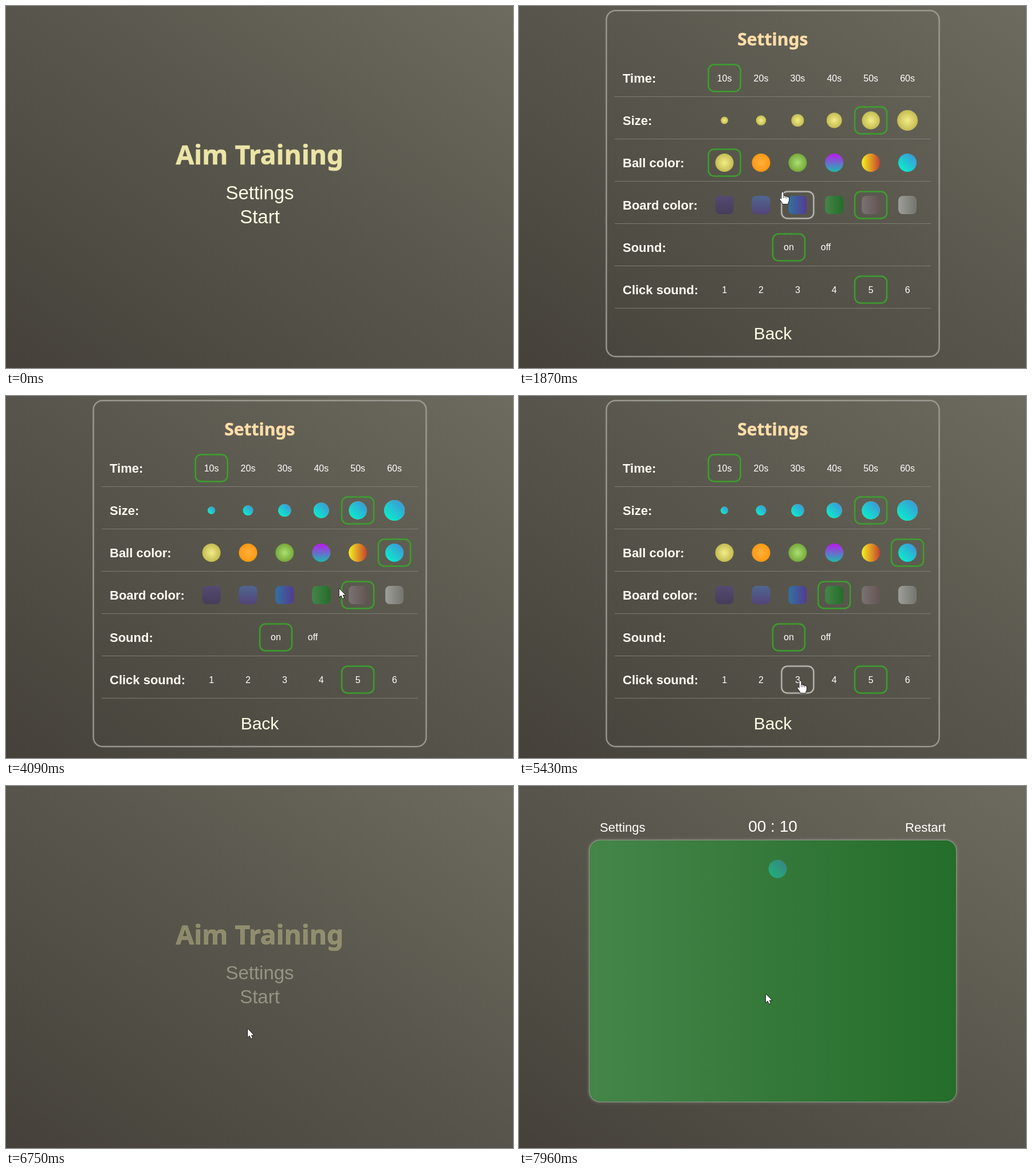
Recreate the animation shown at these times as an HTML page with a canvas. Size 885x633 px, loop 8000 ms.

```html
<!DOCTYPE html>
<html lang="en">
<head>
<meta charset="utf-8">
<title>Aim Training</title>
<style>
html, body { margin: 0; width: 100%; height: 100%; overflow: hidden; }
body { background: linear-gradient(to top right, #45413a, #58564c 52%, #6d6b5f); }
canvas { display: block; }
</style>
</head>
<body>
<canvas id="stage" width="885" height="633"></canvas>
<script>
const LOOP = 8000, FADE = 400, HOVER_FADE = 200;
const ctx = document.getElementById('stage').getContext('2d');
const SANS = '"Liberation Sans", Arial, sans-serif';
const HEADING = '"Noto Sans", Tahoma, sans-serif';
const GREEN = '#39aa2a', SILVER = '#c4c3bd';

// Moments of the clicks
const CLICK = { settings: 1040, ball: 3340, board: 4480, sound: 5640, back: 6200, start: 7110 };
const MENU_LOAD = 280, GAME_LOAD = 7740;

// Pointer moves: start, end, target x, target y
const MOVES = [
  [780, 781, 520, 345], [781, 1030, 460, 325], [1960, 2100, 392, 340],
  [2100, 2480, 590, 318], [2540, 2640, 596, 286], [2820, 3230, 672, 288],
  [3380, 3770, 582, 337], [4090, 4260, 562, 355], [4520, 4840, 477, 421],
  [5050, 5300, 491, 498], [5990, 6150, 443, 570], [6300, 6750, 422, 425],
  [6750, 7060, 431, 364]
];

const DIRECTION = { radial: [0, 0], down: [0, 1], right: [1, 0], rise: [1, -1] };
const BALLS = [
  'radial #f3ed88 #c3bb52', 'radial #ffb13c #ff9813', 'radial #abdf70 #76a93b',
  'down #bd18ec #1cbbae', 'right #f6f01f #c5412d', 'rise #00fbca #468adb'
];
const BOARDS = [
  'down #534b72 #453d59', 'down #50668f #534479', 'right #32729f #533b92',
  'right #458549 #246d2a', 'right #7a7272 #645553', 'right #9e9e9a #74746e'
];
const LABELS = ['Time:', 'Size:', 'Ball color:', 'Board color:', 'Sound:', 'Click sound:'];

const HAND = new Path2D('M-1.5 1.5Q0-.8 1.5 1.5V7.5Q3.3 6.2 4.5 8Q6.3 7 7.5 9Q10 8 11 11V15Q11 17 9.5 18.5V21H0V19.5Q-1.5 17.5-3.5 15L-5 12.5Q-4.5 10.5-1.5 12.8Z');
const FINGERS = new Path2D('M1.6 7.5V11M4.6 8.2V11M7.6 9.2V11.5');
const ARROW = new Path2D('M0 0V14.5L3.3 11.5L5.6 16.8L8 15.8L5.7 10.6H10.3Z');

const ramp = (t, from, to) => Math.min(1, Math.max(0, (t - from) / (to - from)));
const fadeAt = (t, from) => ramp(t, from, from + FADE);
const column = i => 358.6 + i * 63.9;
const rowY = i => 126 + i * 74;
const ballSize = i => 6.5 + i * 2.3;

let time = 0, overLink = false;

function pointerAt(t) {
  let x = -99, y = -99;
  for (const [from, to, toX, toY] of MOVES) {
    const k = ramp(t, from, to);
    x += (toX - x) * k;
    y += (toY - y) * k;
  }
  return [x, y];
}

// Share of the last moments the pointer spent inside a box, which fades hovers in and out
function hover(cx, cy, halfW, halfH) {
  const samples = 10;
  let hits = 0;
  for (let i = 0; i < samples; i++) {
    const [x, y] = pointerAt(time - i * HOVER_FADE / samples);
    if (Math.abs(x - cx) > halfW || Math.abs(y - cy) > halfH) continue;
    hits++;
    if (i === 0) overLink = true;
  }
  return hits / samples;
}

function faded(alpha, draw) {
  if (alpha <= 0) return;
  ctx.save();
  ctx.globalAlpha *= alpha;
  draw();
  ctx.restore();
}

function text(str, x, y, size, color, align = 'center', weight = 400, font = SANS) {
  ctx.font = `${weight} ${size}px ${font}`;
  ctx.textAlign = align;
  ctx.fillStyle = color;
  ctx.fillText(str, x, y);
}

function heading(str, y, size, color) {
  text(str, 442.8, y, size, color, 'center', 700, HEADING);
  ctx.strokeStyle = color;
  ctx.lineWidth = size * .015;
  ctx.strokeText(str, 442.8, y);
}

function link(str, y, size) {
  const over = hover(443, y - size / 3, size * 1.8, size * .6);
  ctx.save();
  ctx.translate(443, y);
  ctx.scale(1 + .05 * over, 1 + .05 * over);
  text(str, 0, 0, size, '#fffde3');
  faded(over, () => text(str, 0, 0, size, '#ffb046'));
  ctx.restore();
}

function box(x, y, w, h, r) {
  ctx.beginPath();
  ctx.roundRect(x, y, w, h, r);
}

function outline(color, blur) {
  ctx.save();
  ctx.strokeStyle = ctx.shadowColor = color;
  ctx.shadowBlur = blur;
  ctx.lineWidth = 1.5;
  ctx.stroke();
  ctx.restore();
}

function gradient(paint, x, y, r) {
  const [name, first, last] = paint.split(' ');
  const [dx, dy] = DIRECTION[name];
  const g = name === 'radial'
    ? ctx.createRadialGradient(x, y, 0, x, y, r)
    : ctx.createLinearGradient(x - dx * r, y - dy * r, x + dx * r, y + dy * r);
  g.addColorStop(0, first);
  g.addColorStop(1, last);
  return g;
}

function ball(paint, x, y, r) {
  ctx.fillStyle = gradient(paint, x, y, r);
  ctx.beginPath();
  ctx.arc(x, y, r, 0, 7);
  ctx.fill();
}

function board(paint, x, y, halfW, halfH, r) {
  box(x - halfW, y - halfH, halfW * 2, halfH * 2, r);
  ctx.fillStyle = gradient(paint, x, y, halfW);
  ctx.fill();
}

// One choice in the settings: its outline is green when selected, silver under the pointer
function option(x, y, selected, draw) {
  const frame = color => {
    box(x - 28, y - 23.5, 56, 47, 10);
    outline(color, 2);
  };
  draw();
  faded(hover(x, y, 28.5, 24) * (1 - selected), () => frame(SILVER));
  faded(selected, () => frame(GREEN));
}

function drawMenu() {
  heading('Aim Training', 277, 46, '#ebe4a6');
  link('Settings', 338, 33);
  link('Start', 380, 33);
}

function drawSettings() {
  box(152.5, 8, 581, 605, 16);
  outline('#a3a29b', 2);
  heading('Settings', 69, 30, '#ffdda9');

  LABELS.forEach((label, row) => {
    text(label, 181, rowY(row) + 8, 22, '#fffdf2', 'left', 700);
    ctx.fillStyle = '#7d7b73';
    ctx.fillRect(167, rowY(row) + 32, 552, 1);
  });

  // Each selection slides from the first chosen column to the second
  const swap = (i, before, after, click) => {
    const k = ramp(time, click, click + 200);
    return i === before ? 1 - k : i === after ? k : 0;
  };
  const recolor = swap(5, 0, 5, CLICK.ball);

  for (let i = 0; i < 6; i++) {
    const x = column(i);
    option(x, rowY(0), +(i === 0), () => text(`${i + 1}0s`, x, rowY(0) + 6, 16, '#fff'));
    option(x, rowY(1), +(i === 4), () => {
      ball(BALLS[0], x, rowY(1), ballSize(i));
      faded(recolor, () => ball(BALLS[5], x, rowY(1), ballSize(i)));
    });
    option(x, rowY(2), swap(i, 0, 5, CLICK.ball), () => ball(BALLS[i], x, rowY(2), 16));
    option(x, rowY(3), swap(i, 4, 3, CLICK.board), () => board(BOARDS[i], x, rowY(3), 16, 16, 8));
    option(x, rowY(5), swap(i, 4, 2, CLICK.sound), () => text(i + 1, x, rowY(5) + 6, 16, '#fff'));
  }
  ['on', 'off'].forEach((label, i) => {
    const x = 471 + i * 64.5;
    option(x, rowY(4), 1 - i, () => text(label, x, rowY(4) + 5, 16, '#fff'));
  });
  link('Back', 583, 30);
}

function drawGame() {
  text('Settings', 141, 80, 22, '#fff', 'left');
  text('00 : 10', 443, 80, 28, '#fff');
  text('Restart', 745, 80, 22, '#fff', 'right');
  box(123, 95, 640, 457, 18);
  outline('#a5a8a0', 5);
  board(BOARDS[3], 443, 323.5, 320, 228.5, 18);
  faded(.45 * ramp(time, GAME_LOAD, LOOP - 40), () => ball(BALLS[5], 451.5, 145, 16));
}

function drawPointer() {
  const shape = overLink ? HAND : ARROW;
  ctx.save();
  ctx.translate(...pointerAt(time));
  ctx.lineWidth = 1.6;
  ctx.lineJoin = 'round';
  ctx.strokeStyle = '#111';
  ctx.fillStyle = '#fff';
  ctx.stroke(shape);
  ctx.fill(shape);
  ctx.lineWidth = .8;
  if (overLink) ctx.stroke(FINGERS);
  ctx.restore();
}

function render(now) {
  time = now % LOOP;
  overLink = false;
  const menu = time < MENU_LOAD ? 1
    : fadeAt(time, MENU_LOAD) - fadeAt(time, CLICK.settings)
      + fadeAt(time, CLICK.back + FADE) - fadeAt(time, CLICK.start);
  const settings = fadeAt(time, CLICK.settings + FADE) - fadeAt(time, CLICK.back);
  ctx.clearRect(0, 0, 885, 633);
  faded(menu, drawMenu);
  faded(settings, drawSettings);
  faded(ramp(time, GAME_LOAD, GAME_LOAD + FADE / 2), drawGame);
  drawPointer();
}

const start = performance.now();
(function tick() {
  render(performance.now() - start);
  requestAnimationFrame(tick);
})();
</script>
</body>
</html>
```
